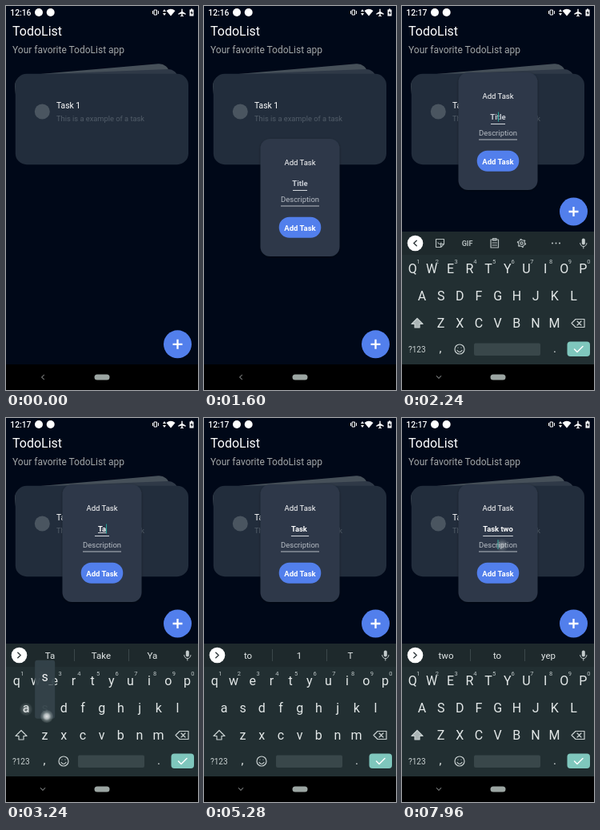
An HTML page that plays this animation: 240 px wide and 480 px high, repeating every 8000 ms.

```html
<!DOCTYPE html>
<html lang="en">
<head>
<meta charset="utf-8">
<title>Todo list</title>
<style>
html, body { margin: 0; width: 100%; height: 100%; overflow: hidden; background: #000; }
svg { display: block; width: 240px; height: 480px; font-family: Roboto, sans-serif; }
text { white-space: pre; }
.mid { text-anchor: middle; }
.line { fill: none; stroke-linecap: round; stroke-linejoin: round; }
</style>
</head>
<body>
<svg id="stage" viewBox="0 0 240 480" xmlns="http://www.w3.org/2000/svg">
  <defs>
    <radialGradient id="glow">
      <stop offset="0" stop-color="#fff" stop-opacity=".95"/>
      <stop offset=".4" stop-color="#e4eaea" stop-opacity=".8"/>
      <stop offset=".7" stop-color="#b8c4c4" stop-opacity=".4"/>
      <stop offset="1" stop-color="#b8c4c4" stop-opacity=".12"/>
    </radialGradient>
    <filter id="shade" x="-20%" y="-20%" width="140%" height="140%">
      <feDropShadow dx="0" dy="1" stdDeviation="1.5" flood-color="#000" flood-opacity=".4"/>
    </filter>
  </defs>

  <rect width="240" height="480" fill="#fcfefc"/>
  <rect id="bg" width="240" height="448" fill="#000818"/>

  <g id="status" fill="#fff">
    <text id="clock" x="5.300" y="12" font-size="10.300" font-weight="500">12:16</text>
    <circle cx="41" cy="8" r="5"/>
    <circle cx="55.700" cy="8" r="5"/>
    <g class="line" stroke="#fff">
      <rect x="185.500" y="5" width="3" height="6"/>
      <path d="M183.500 6.500v3M190.500 6.500v3"/>
    </g>
    <path d="M196 7l2-3 2 3zM196 9l2 3 2-3z"/>
    <path d="M200.500 6q5.500-4.500 11 0l-5.500 6.500z"/>
    <path d="M219.300 4q.7-1 1.400 0v3l4 2.500v1.200l-4-1.200v2l1.200 1v.8l-1.900-.5-1.900.5v-.8l1.200-1v-2l-4 1.200V9.500l4-2.500z"/>
    <path d="M229.500 4.500h1.500v-1h2v1h1.500v8h-5z"/>
    <path d="M232.500 5.500l-2 3.500h1.300v2.500l2-3.500h-1.300z" fill="#000818"/>
  </g>

  <text x="8" y="37" font-size="16" fill="#fff">TodoList</text>
  <text x="8" y="58.500" font-size="12" fill="#a3a7a8">Your favorite TodoList app</text>
  <rect width="194" height="90" rx="13" fill="#465059" transform="translate(10 88) rotate(-5)"/>
  <rect width="204" height="95" rx="13" fill="#2f3947" transform="translate(11 86.600) rotate(-2.300)"/>
  <rect x="11.800" y="84.800" width="216.200" height="113.400" rx="14" fill="#222d3c"/>
  <circle cx="45.300" cy="132" r="9.500" fill="#4a5560"/>
  <text x="63" y="128.200" font-size="10.300" fill="#fff">Task 1</text>
  <text x="63" y="144" font-size="9.300" fill="#525d69">This is a example of a task</text>

  <g id="fab">
    <circle r="17.500" fill="#527fec"/>
    <path d="M-6 0H6M0-6V6" stroke="#fff" stroke-width="2.300"/>
  </g>
  <rect y="448" width="240" height="32"/>

  <g id="modal">
    <rect x="70.500" width="99" height="147" rx="12" fill="#2d3748" filter="url(#shade)"/>
    <g class="mid" font-size="9.500">
      <text x="120" y="33" fill="#fff">Add Task</text>
      <text id="hint" x="120" y="59" fill="#c9ced6" font-weight="700">Title</text>
      <text x="120" y="78.500" fill="#b6bcc4">Description</text>
    </g>
    <text id="typed" y="59" font-size="9.400" font-weight="700" fill="#fff"></text>
    <rect id="compose" y="60.200" height=".8" fill="#fff"/>
    <rect id="rule" y="64" height="1" fill="#d5d9df"/>
    <rect x="96" y="83.500" width="48" height="1" fill="#b6bcc4"/>
    <rect id="caret" width="1" height="12" fill="#26a69a"/>
    <rect x="93.700" y="97.800" width="52.600" height="26" rx="13" fill="#527fec"/>
    <text class="mid" x="120" y="114.500" font-size="9.500" font-weight="700" fill="#fff">Add Task</text>
  </g>

  <g id="board">
    <rect y="282" width="240" height="166" fill="#222f32"/>
    <rect y="282" width="240" height="29" fill="#1e292c"/>
    <circle cx="16.500" cy="296.500" r="9.800" fill="#fff"/>
    <path id="arrow" class="line" stroke="#333c3f" stroke-width="1.500" d="M-1.700-3.200L1.700 0-1.700 3.200"/>
    <g fill="#c3cbcc">
      <rect x="224.800" y="290.500" width="4" height="8" rx="2"/>
      <path class="line" stroke="#c3cbcc" d="M222.700 296.500a4.100 4.100 0 0 0 8.200 0M226.800 300.600v2.400"/>
    </g>
    <g id="tools" class="line" stroke="#b3bcbd" stroke-width="1.200">
      <path d="M42.500 291.500h10v6l-4 4h-6zM52.500 297.500h-4v4M45 296q2 3 4 0"/>
      <path d="M111 292h9.500v10H111zM113.500 290.500h4.500v2.500h-4.500zM113 296h5.500M113 299h5.500"/>
      <circle cx="149.500" cy="296.500" r="1.600"/>
      <circle cx="149.500" cy="296.500" r="4"/>
      <circle cx="149.500" cy="296.500" r="5" stroke-width="1.400" stroke-dasharray="2 3.236" stroke-linecap="butt"/>
      <path d="M188 296.500h.01M192.500 296.500h.01M197 296.500h.01" stroke-width="2.200"/>
      <text class="mid" x="81.500" y="300" font-size="9" font-weight="700" fill="#b3bcbd" stroke="none">GIF</text>
    </g>
    <g id="words" class="mid" font-size="11.500" fill="#e3e8e8">
      <text x="55" y="301"></text><text x="119" y="301"></text><text x="183" y="301"></text>
      <path d="M85.500 289v15M153.500 289v15" stroke="#3b484b"/>
    </g>
    <g id="keys" class="mid" fill="#e3e8e8"></g>
    <path id="shift" stroke="#c9d1d1" stroke-width="1.200" stroke-linejoin="round" d="M19 390.500l-7 7h4v4.500h6v-4.500h4z"/>
    <g class="line" stroke="#c9d1d1" stroke-width="1.200">
      <path d="M217 391.500h11v10h-11l-5-5zM219 394l5 5M224 394l-5 5"/>
      <circle cx="72" cy="429" r="6"/>
      <path d="M69 430.500q3 4 6 0M70 427h.01M74 427h.01"/>
    </g>
    <text x="8" y="432.500" font-size="10" fill="#c9d1d1">?123</text>
    <text class="mid" x="48" y="433" font-size="15" fill="#e3e8e8">,</text>
    <text class="mid" x="191" y="433" font-size="15" fill="#e3e8e8">.</text>
    <rect x="90" y="421.500" width="83" height="15.500" rx="2" fill="#39474a"/>
    <rect x="206.500" y="419.500" width="28.500" height="18.500" rx="4" fill="#7fc7bd"/>
    <path class="line" stroke="#fff" stroke-width="1.500" d="M215.500 429l3.500 3.500 7-7"/>
    <g id="popup">
      <rect x="-12.500" y="-60" width="25" height="73" rx="3" fill="#34434a"/>
      <text class="mid" y="-34" font-size="16" fill="#fff"></text>
      <text class="mid" x="7" y="-29" font-size="8" fill="#c9d1d1">…</text>
    </g>
  </g>

  <path id="back" class="line" stroke="#a3a6a6" d="M1.500-2.700L-1.500 0 1.500 2.700"/>
  <rect x="110.500" y="460.500" width="19" height="7" rx="3.500" fill="#9ba5a2"/>
  <g id="touches"></g>
</svg>
<script>
const LOOP = 8000;
const $ = id => document.getElementById(id);
const clamp = v => Math.max(0, Math.min(1, v));
const ramp = (t, from, to) => clamp((t - from) / (to - from));
const easeOut = p => 1 - (1 - p) * (1 - p);
const latest = (list, t) => list.filter(e => e[0] <= t).pop();
const set = (el, attrs) => { for (const k in attrs) el.setAttribute(k, attrs[k]); };
const show = (el, on) => set(el, { opacity: +on });
const put = (el, s) => { if (el.textContent !== s) el.textContent = s; };

function add(parent, tag, attrs, text = '') {
  const el = document.createElementNS('http://www.w3.org/2000/svg', tag);
  set(el, attrs);
  el.textContent = text;
  parent.appendChild(el);
  return el;
}

const keys = {};
[['qwertyuiop', 13.3, 333.5], ['asdfghjkl', 25, 367.8], ['zxcvbnm', 48.5, 401.8]].forEach(([row, x0, y], r) => {
  [...row].forEach((ch, i) => {
    const x = x0 + i * 23.68;
    keys[ch] = { x, y: y - 5, el: add($('keys'), 'text', { x, y, 'font-size': 16 }, ch) };
    if (!r) add($('keys'), 'text', { x: x + 7, y: 322, 'font-size': 7.5, fill: '#bcc5c6' }, String((i + 1) % 10));
  });
});

// time, text, start of the word being composed
const typing = [
  [0, '', 0], [2840, 'T', 0], [3160, 'Ta', 0], [3320, 'Tas', 0], [3520, 'Task', 0], [3760, 'Task ', 5],
  [6240, 'Task t', 5], [6560, 'Task tw', 5], [6880, 'Task two', 5], [7840, 'Task two', 8]
];
const suggestions = [
  [0, '', '', ''], [2880, 'T', 'The', 'To'], [3200, 'Ta', 'Take', 'Ya'], [3360, 'Tas', 'Task', 'Tasks'],
  [3560, 'Task', 'Tasks', 'Taska'], [3840, 'to', '1', 'T'], [6320, 't', 'T', 'to'],
  [6640, 'tw', 'two', 'TW'], [7040, 'two', 'to', 'yep']
];
const caretOn = [[1960, 2440], [2800, 4160], [4680, 5160], [5680, 7400], [7840, 8200]];

// x, y, down, up, key
const touches = [
  [214, 424, 660, 800], [121, 222, 1620, 1960],
  [108, 335, 2760, 2860, 't'], [25, 364, 3040, 3160, 'a'], [51, 373, 3200, 3320, 's'],
  [186, 366, 3400, 3500, 'k'], [130, 433, 3680, 3780],
  [108, 335, 6160, 6250, 't'], [43, 339, 6440, 6560, 'w'], [204, 336, 6780, 6890, 'o'],
  [125, 159, 7720, 7880]
].map(([x, y, down, up, key]) => ({
  down, up, key,
  el: add($('touches'), 'circle', { cx: x, cy: y, r: 8, fill: 'url(#glow)' })
}));

function drawModal(t) {
  const slide = 480 - 314 * easeOut(ramp(t, 957, 1240));
  set($('modal'), { transform: `translate(0 ${t < 2120 ? slide : 83})` });
  const [, text, start] = latest(typing, t);
  const typed = $('typed');
  put(typed, text);
  const w = text ? typed.getComputedTextLength() : 0;
  const x = 120 - w / 2;
  set(typed, { x });
  show($('hint'), !text);
  const rule = Math.max(18, w);
  set($('rule'), { x: 120 - rule / 2, width: rule });
  const lead = start ? typed.getSubStringLength(0, Math.min(start, text.length)) : 0;
  set($('compose'), { x: x + lead, width: Math.max(0, w - lead) });

  const inNotes = t >= 7840;
  const blink = Math.max(...caretOn.map(([a, b]) => Math.min(ramp(t, a - 40, a + 80), 1 - ramp(t, b - 40, b + 80))));
  set($('caret'), { x: inNotes ? 119.5 : x + w, y: inNotes ? 69 : 49.5, opacity: blink });
}

function drawBoard(t) {
  const rise = easeOut(ramp(t, 1962, 2200));
  set($('board'), { transform: `translate(0 ${104 * (1 - rise)})`, opacity: rise * rise * (2 - rise) + rise * (1 - rise) * 0.3 });
  set($('back'), { transform: `translate(46 464) rotate(${-90 * rise})` });

  const upper = t < 2860 || t >= 7840;
  const cased = ch => upper ? ch.toUpperCase() : ch;
  for (const ch in keys) put(keys[ch].el, cased(ch));
  set($('shift'), { fill: upper ? '#aab4b5' : 'none' });

  const open = t >= 2880;
  show($('tools'), !open);
  show($('words'), open);
  set($('arrow'), { transform: `translate(16.5 296.5) scale(${open ? 1 : -1} 1)` });
  const words = latest(suggestions, t).slice(1);
  $('words').querySelectorAll('text').forEach((el, i) => {
    put(el, words[i]);
    set(el, { 'font-weight': words[i] === 'T' && i === 1 ? 700 : 400 });
  });

  const hit = touches.find(p => p.key && t >= p.down && t < p.up + 30);
  set($('popup'), { opacity: hit ? 0.95 : 0 });
  if (hit) {
    const { x, y } = keys[hit.key];
    set($('popup'), { transform: `translate(${x} ${y})` });
    put($('popup').querySelector('text'), cased(hit.key));
  }
}

function draw(t) {
  const resized = t >= 1920;
  put($('clock'), t < 1900 ? '12:16' : '12:17');
  set($('bg'), { height: resized ? 282 : 448 });
  const dim = ramp(t, 680, 800) * (1 - ramp(t, 960, 1200));
  set($('fab'), { transform: `translate(214.5 ${resized ? 257 : 422.8})`, opacity: 1 - 0.34 * dim });
  drawModal(t);
  drawBoard(t);
  for (const p of touches) {
    const fade = 1 - ramp(t, p.up, p.up + 150);
    set(p.el, { opacity: t < p.down ? 0 : 0.9 * fade });
  }
}

const begin = performance.now();
function frame() {
  draw((performance.now() - begin) % LOOP);
  requestAnimationFrame(frame);
}
frame();
</script>
</body>
</html>
```
